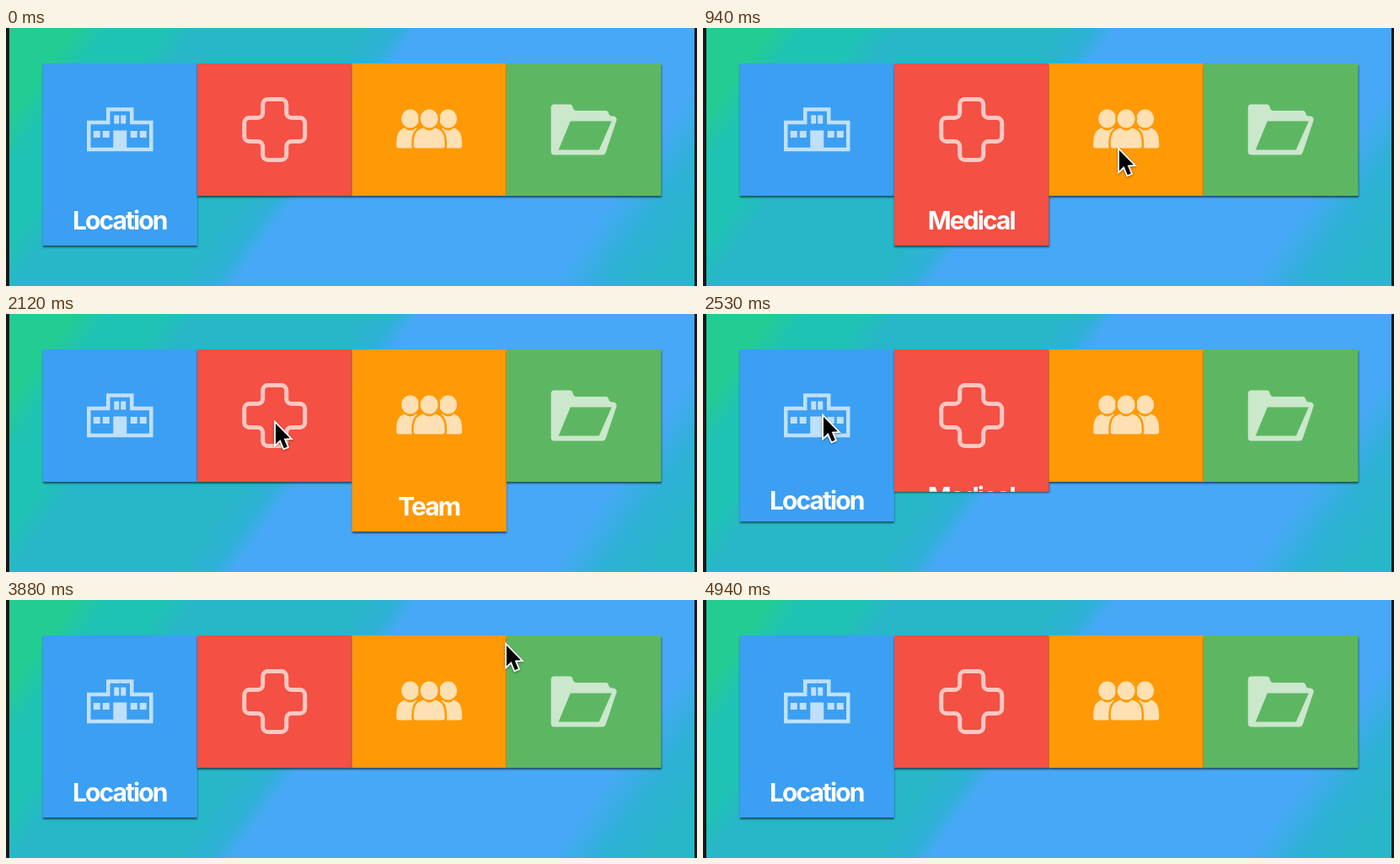
Recreate the animation shown at these times as an HTML page with a canvas. Size 820 by 306 pixels, loop 6350 ms.

```html
<!DOCTYPE html>
<html lang="en">
<head>
<meta charset="utf-8">
<title>Expanding tiles</title>
<style>
html, body { margin: 0; width: 100%; height: 100%; overflow: hidden; background: #10171d; }
canvas { display: block; }
</style>
</head>
<body>
<canvas id="stage" width="820" height="306"></canvas>
<script>
const ctx = document.getElementById('stage').getContext('2d');
const LOOP = 6350, FPS = 17;
const LEFT = 43.5, WIDTH = 183.5, TOP = 42, SHUT = 199, OPEN = 258, MIDDLE = 120.5;
const HOP = 4;

const tiles = [
  { label: 'Location', color: '#3b9ff3', ink: '#bfe0fb', icon: hospital },
  { label: 'Medical', color: '#f45044', ink: '#fdc7c2', icon: cross },
  { label: 'Team', color: '#ff9906', ink: '#ffe0b2', icon: people },
  { label: 'General', color: '#5db762', ink: '#cbe7cc', icon: folder }
];

// The pointer rests at each stop until its tile opens, then hops on.
const tours = [
  {
    enter: { step: 5, x: 247, y: 213 },
    stops: [
      { step: 12, tile: 1, x: 320, y: 144 },
      { step: 18, tile: 2, x: 492, y: 141 },
      { step: 25, tile: 3, x: 690, y: 124 },
      { step: 32, tile: 2, x: 500, y: 126 },
      { step: 38, tile: 1, x: 318, y: 126 },
      { step: 43, tile: 0, x: 141, y: 118 }
    ],
    exit: { step: 49, x: 134, y: 246 }
  },
  {
    enter: { step: 64, x: 640, y: 11 },
    stops: [{ step: 69, tile: 2, x: 544, y: 89 }],
    exit: { step: 76, x: 526, y: 222 }
  }
];
const switches = [...tours.flatMap(tour => tour.stops), { step: 80, tile: 0 }];

function polygon(points) {
  points.forEach(([x, y]) => ctx.lineTo(x, y));
  ctx.closePath();
}

function rounded(corners, radius) {
  const last = corners[corners.length - 1], first = corners[0];
  ctx.moveTo((last[0] + first[0]) / 2, (last[1] + first[1]) / 2);
  corners.forEach(([x, y], i) => {
    const next = corners[(i + 1) % corners.length];
    ctx.arcTo(x, y, next[0], next[1], radius);
  });
  ctx.closePath();
}

function background() {
  ctx.fillStyle = '#10171d';
  ctx.fillRect(0, 0, 820, 306);
  const span = 1040, slope = 0.72, k = span / (1 + slope * slope);
  const g = ctx.createLinearGradient(0, 0, k, k * slope);
  const green = '#23cc92', teal = '#1fc3b4', cyan = '#28b6c9', sky = '#2eb1d6', blue = '#48a8f8';
  [[80, green], [120, teal], [190, teal], [230, cyan], [425, cyan], [465, sky], [490, blue],
   [865, blue], [925, sky], [985, cyan]
  ].forEach(([at, color]) => g.addColorStop(at / span, color));
  ctx.fillStyle = g;
  ctx.fillRect(4, 0, 813, 306);
}

// Icons are drawn around the middle of a closed tile.
function hospital() {
  ctx.lineWidth = 4.5;
  for (const s of [-1, 1]) {
    ctx.beginPath();
    ctx.moveTo(0, -24);
    for (const [x, y] of [[14, -24], [14, -8.5], [37, -8.5], [37, 23.5], [0, 23.5]]) ctx.lineTo(s * x, y);
    ctx.stroke();
    ctx.fillRect(s * 16.5 - 4, 1.5, 8, 8);
    ctx.fillRect(s * 27.5 - 4, 1.5, 8, 8);
    ctx.fillRect(s * 4 - 3, -17, 6, 10);
  }
  ctx.fillRect(-8, 1, 16, 24);
}

function cross() {
  const arm = 36, half = 14, corners = [];
  for (let i = 0; i < 4; i++) {
    const c = Math.round(Math.cos(i * Math.PI / 2)), s = Math.round(Math.sin(i * Math.PI / 2));
    for (const [x, y] of [[-half, -arm], [half, -arm], [half, -half]]) {
      corners.push([x * c - y * s, x * s + y * c]);
    }
  }
  ctx.lineWidth = 5;
  ctx.beginPath();
  rounded(corners, 6);
  ctx.stroke();
}

function person(x, half) {
  ctx.beginPath();
  ctx.ellipse(x, -13, 10.5, 11, 0, 0, 7);
  ctx.moveTo(x - 7, -2);
  ctx.quadraticCurveTo(x, 4, x + 7, -2);
  ctx.bezierCurveTo(x + half - 2, 1, x + half, 6, x + half, 19);
  ctx.quadraticCurveTo(x + half, 22, x + half - 3, 22);
  ctx.lineTo(x - half + 3, 22);
  ctx.quadraticCurveTo(x - half, 22, x - half, 19);
  ctx.bezierCurveTo(x - half, 6, x - half + 2, 1, x - 7, -2);
}

function people(tile) {
  for (const x of [-22.5, 22.5]) {
    person(x, 16.5);
    ctx.fill();
  }
  person(0, 18.5);
  ctx.strokeStyle = tile.color;
  ctx.lineWidth = 5;
  ctx.stroke();
  ctx.fill();
}

function folder() {
  ctx.beginPath();
  rounded([[-39, -30], [-14, -30], [-12, -22.5], [29, -22.5], [30, -16],
           [40.5, -16], [25, 30], [-39, 30]], 4);
  ctx.moveTo(-16, -10);
  polygon([[33, -10], [18, 24], [-30, 24]]);
  ctx.fill('evenodd');
}

function drawTile(tile, x, open, drop) {
  const h = SHUT - TOP + (OPEN - SHUT) * open;
  ctx.save();
  ctx.shadowColor = 'rgba(0,0,0,.55)';
  ctx.shadowBlur = 2;
  ctx.shadowOffsetY = 1.5;
  ctx.fillStyle = tile.color;
  ctx.fillRect(x, TOP, WIDTH, h);
  ctx.restore();

  ctx.save();
  ctx.beginPath();
  ctx.rect(x, TOP, WIDTH, h);
  ctx.clip();
  ctx.translate(x + WIDTH / 2, MIDDLE);
  ctx.fillStyle = ctx.strokeStyle = tile.ink;
  tile.icon(tile);
  if (open > 0) {
    ctx.fillStyle = '#fff';
    ctx.font = '700 30px Inter, sans-serif';
    ctx.letterSpacing = '-1.9px';
    ctx.textAlign = 'center';
    ctx.fillText(tile.label, -0.5, 118 - drop);
  }
  ctx.restore();
}

function drawTiles(step) {
  let from = 0, to = 0, u = 1;
  for (const change of switches) {
    if (step < change.step) break;
    from = to;
    to = change.tile;
    u = Math.min(1, 0.5 + (step - change.step) * 0.147);
  }
  const p = 1 - Math.pow(1 - u, 2.32);
  tiles.forEach((tile, i) => {
    const x = LEFT + WIDTH * i;
    if (i === to) drawTile(tile, x, p, 30 * (1 - p));
    else if (i === from) drawTile(tile, x, 1 - p, 14 * p);
    else drawTile(tile, x, 0, 0);
  });
}

function pointerAt(step) {
  const tour = tours.find(t => step >= t.enter.step && step <= t.exit.step);
  if (!tour) return null;
  let { enter: here, exit, stops } = tour;
  let leave = here.step;
  for (const next of [...stops, exit]) {
    const last = next === exit;
    if (last) leave = exit.step - 2;
    if (step < leave) break;
    const f = Math.min(1, (step - leave) / (last ? 2 : HOP));
    if (f < 1 || step < next.step || last) {
      return [here.x + (next.x - here.x) * f, here.y + (next.y - here.y) * f];
    }
    here = next;
    leave = next.step;
  }
  return [here.x, here.y];
}

function drawPointer([x, y]) {
  ctx.save();
  ctx.translate(x + 2, y + 4);
  ctx.scale(0.9, 0.9);
  ctx.beginPath();
  polygon([[0, 0], [0, 27], [6.2, 21.2], [11, 32.5], [15.4, 30.6], [10.8, 19.6], [18.8, 19.2]]);
  ctx.lineWidth = 4;
  ctx.strokeStyle = '#fff';
  ctx.shadowColor = 'rgba(0,0,0,.4)';
  ctx.shadowBlur = 3;
  ctx.shadowOffsetY = 1;
  ctx.stroke();
  ctx.shadowColor = 'transparent';
  ctx.fillStyle = '#000';
  ctx.fill();
  ctx.restore();
}

function render(now) {
  // the motion advances in steps of 1/17 s
  const step = Math.floor((now % LOOP + 5) * FPS / 1000);
  background();
  drawTiles(step);
  const pointer = pointerAt(step);
  if (pointer) drawPointer(pointer);
}

const begin = performance.now();
function tick() {
  render(performance.now() - begin);
  requestAnimationFrame(tick);
}
tick();
</script>
</body>
</html>
```
